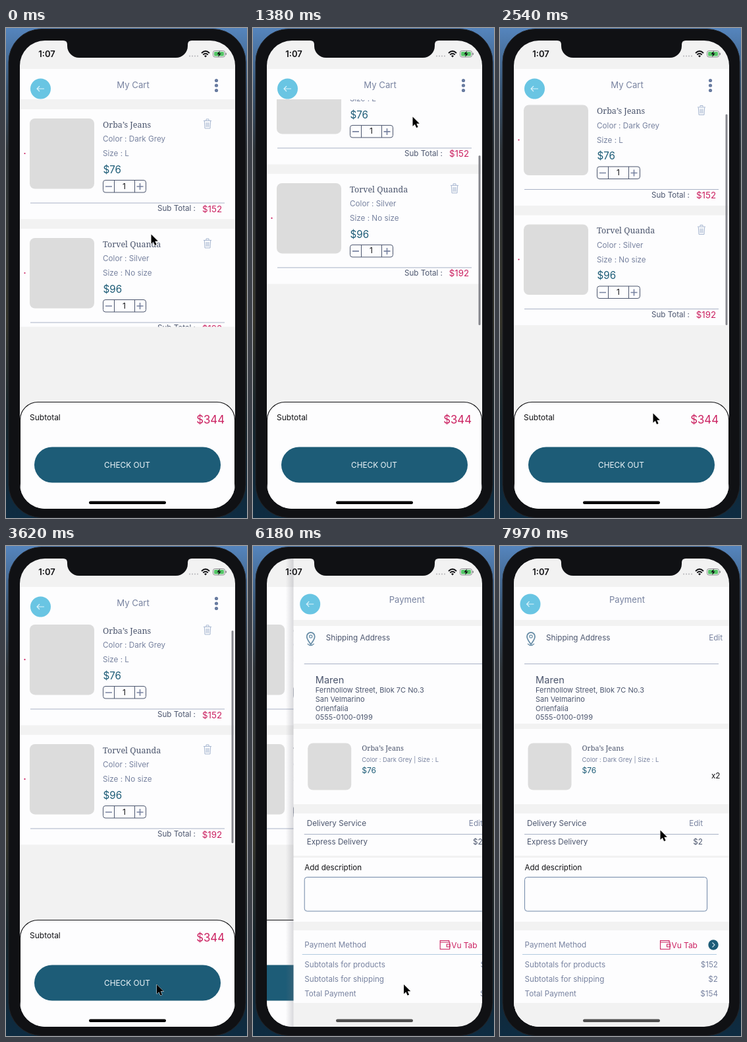
Recreate the animation shown at these times as an HTML page. Size 366x742 px, loop 8000 ms.

```html
<!DOCTYPE html>
<html lang="en">
<head>
<meta charset="utf-8">
<title>Cart to payment</title>
<style>
  html, body { margin: 0; width: 100%; height: 100%; overflow: hidden; background: #101114; }
  svg { display: block; width: 100vw; height: 100vh; font-family: Inter, "Open Sans", sans-serif; }
  .slab { font-family: "Noto Serif", serif; }
</style>
</head>
<body>
<svg id="stage" viewBox="0 0 366 742"></svg>
<script>
const LOOP = 8000;
const PAGE_WIDTH = 327;
const LIST = { top: 108, height: 344, maxScroll: 18 };
const C = {
  page: '#f2f2f2', paper: '#fdfdfe', photo: '#dcdcdc', bezel: '#101114',
  blue: '#1d5c77', sky: '#69c5e3', red: '#cb2060', ink: '#111114',
  slate: '#4c566e', muted: '#7883a0', line: '#a9b2c6'
};

// Shape helpers; text is placed by the vertical middle of its capitals.
const rect = (x, y, w, h, fill, extra = '') =>
  `<rect x="${x}" y="${y}" width="${w}" height="${h}" fill="${fill}" ${extra}/>`;
const circle = (x, y, r, fill) => `<circle cx="${x}" cy="${y}" r="${r}" fill="${fill}"/>`;
const stroke = (d, color, width = 1, extra = '') =>
  `<path d="${d}" fill="none" stroke="${color}" stroke-width="${width}" ${extra}/>`;
const text = (x, y, str, size, fill, extra = '') =>
  `<text x="${x}" y="${y + size * 0.38}" font-size="${size}" fill="${fill}" ${extra}>${str}</text>`;
const middle = 'text-anchor="middle"';
const end = 'text-anchor="end"';
const band = (y1, y2) => rect(21, y1, PAGE_WIDTH, y2 - y1, C.paper);

const backButton = (x, y) => circle(x, y, 15.5, C.sky) +
  stroke(`M${x + 5.5} ${y}h-11m4 -4l-4 4l4 4`, '#dcf3fb', 1.1);

const trash = (x, y) => stroke(
  `M${x - 6} ${y - 4.5}h12M${x - 2} ${y - 5}v-2h4v2M${x - 4.7} ${y - 4}l.7 11h8l.7 -11` +
  `M${x - 2} ${y - 2}v7M${x} ${y - 2}v7M${x + 2} ${y - 2}v7`, '#a6b6d0');

function cartItem(dy, name, size, color, price, total) {
  return `<g transform="translate(0 ${dy})">` +
    band(123, 289.5) +
    rect(36, 137, 98, 106.5, C.photo, 'rx="8"') +
    circle(28.5, 190, 1.1, C.red) +
    text(147, 146, name, 12.5, C.slate, 'class="slab" font-weight="500"') +
    text(147, 168, 'Color : ' + color, 11.7, C.muted) +
    text(147, 190, 'Size : ' + size, 11.7, C.muted) +
    text(147.5, 214, price, 15.2, C.blue) +
    trash(306, 145) +
    rect(147.5, 230.5, 65, 18.5, 'none', `rx="3.5" stroke="${C.slate}"`) +
    stroke('M164.5 230.5v18.5M195.5 230.5v18.5', C.slate) +
    stroke('M151 240h10M198.5 240h10M203.5 235v10', C.muted, 1.6) +
    text(179.5, 239, '1', 12, C.ink, middle) +
    stroke('M37 265h295', C.line) +
    text(230, 273, 'Sub Total :', 11.6, C.slate) +
    text(328, 273.5, total, 13.3, C.red, end) +
    '</g>';
}

const cartPage =
  rect(21, 19, PAGE_WIDTH, 709, C.page) + band(62, 108) +
  backButton(52.5, 92) +
  text(193, 86, 'My Cart', 13.2, C.muted, middle) +
  [79.5, 87, 94.5].map(y => circle(319.5, y, 2.6, '#687ba0')).join('') +
  `<g clip-path="url(#listClip)"><g id="list">` +
  cartItem(0, 'Orba’s Jeans', 'L', 'Dark Grey', '$76', '$152') +
  cartItem(181, 'Torvel Quanda', 'No size', 'Silver', '$96', '$192') +
  '</g></g>' +
  rect(342.5, 110, 3, 322, '#85868c', 'id="scrollbar" rx="1.5"') +
  rect(21.5, 566.5, 326, 300, C.paper, `rx="27" stroke="${C.ink}" stroke-width="1.1"`) +
  text(36, 589, 'Subtotal', 12, C.ink) +
  text(332, 592.3, '$344', 16.8, C.red, end) +
  `<g id="button">${rect(43, 634.5, 283, 54, C.blue, 'rx="27"')}</g>` +
  text(184, 661.7, 'CHECK OUT', 11.8, '#eef6fa', middle);

const addressLines = ['Fernhollow Street, Blok 7C No.3', 'San Velmarino', 'Orlenfalia', '0555-0100-0199'];
const totals = [['Subtotals for products', '$152'], ['Subtotals for shipping', '$2'], ['Total Payment', '$154']];

const paymentPage =
  rect(9, 19, 12, 709, 'url(#edgeShadow)', 'id="shadow"') +
  rect(21, 19, PAGE_WIDTH, 709, C.page) +
  [[62, 112], [121, 269], [277, 391], [405, 469], [472, 569], [582, 692]].map(b => band(...b)).join('') +
  backButton(46, 88) +
  text(193, 81.5, 'Payment', 13.1, C.muted, middle) +
  // Shipping
  stroke('M47 149c-4 -6 -6 -8 -6 -12a6 6 0 0 1 12 0c0 4 -2 6 -6 12z', '#6b8fa8', 1.8) +
  stroke('M49.2 137a2.2 2.2 0 1 1 -4.4 0a2.2 2.2 0 1 1 4.4 0M42 148q5 5 10 0', '#6b8fa8', 1.2) +
  text(70, 138.5, 'Shipping Address', 11.7, C.slate) +
  text(338, 138.5, 'Edit', 11.7, C.muted, end) +
  stroke('M37 178.5h295', C.line) +
  text(54, 202, 'Maren', 14.6, C.slate) +
  addressLines.map((s, i) => text(54, 218 + i * 13.7, s, 11, C.slate)).join('') +
  // Product
  rect(42.5, 298.5, 66, 71, C.photo, 'rx="8"') +
  text(124.5, 306, 'Orba’s Jeans', 10.9, C.slate, 'class="slab" font-weight="500"') +
  text(124.5, 323, 'Color : Dark Grey | Size : L', 9.4, C.muted) +
  text(124.5, 339.5, '$76', 12, C.blue) +
  text(334.5, 348, 'x2', 11.7, C.ink, end) +
  // Delivery
  text(41, 420, 'Delivery Service', 11.7, C.slate) +
  text(308, 420, 'Edit', 11.7, C.muted, end) +
  stroke('M37 436.5h295', C.line) +
  text(41, 448, 'Express Delivery', 11.7, C.slate) +
  text(308, 447.5, '$2', 11.7, C.slate, end) +
  text(37.5, 487, 'Add description', 11.6, C.ink) +
  rect(37.5, 501.5, 277, 51.5, 'none', 'rx="4" stroke="#7088a8"') +
  // Payment method
  text(37.5, 604, 'Payment Method', 11.7, C.muted) +
  stroke('M257 600v-2.5h-13.5v13h14.5v-10.5h-14M258.5 603h-5v4h5z', C.red, 1.1) +
  text(260.5, 604, 'Vu Tab', 11.9, C.red) +
  circle(324, 604, 7.7, C.blue) + stroke('M322.5 600.5l3.5 3.5l-3.5 3.5', '#cfe4ee', 1.1) +
  stroke('M34 618.5h295', '#b2cbe0') +
  totals.map(([label, sum], i) =>
    text(37.5, 634 + i * 22, label, 11.7, C.muted) + text(331, 634 + i * 22, sum, 11.7, C.muted, end)).join('');

const statusBar =
  text(62, 39.5, '1:07', 13, C.ink, middle + ' font-weight="600"') +
  [279, 283, 287, 291].map(x => circle(x, 42.5, 1, '#b4b4b8')).join('') +
  stroke('M297 38q6 -6 12 0M299.3 40.5q3.7 -3.6 7.4 0', C.ink, 1.9) +
  `<path d="M301 42.2q2 -1.8 4 0l-2 2.4z" fill="${C.ink}"/>` +
  rect(314.5, 34.5, 18, 9.5, 'none', 'rx="2.8" stroke="#8c8c90"') +
  rect(316, 36, 15, 6.5, '#55c667', 'rx="1.5"') + rect(333.5, 37.5, 1.5, 3.5, '#8c8c90', 'rx=".7"') +
  `<path d="M324.8 34.5l-4.5 5.2h2.8l-.9 4.3l4.6 -5.4h-2.8z" fill="${C.ink}"/>`;

document.getElementById('stage').innerHTML = `
  <defs>
    <clipPath id="screenClip"><rect x="21" y="19" width="${PAGE_WIDTH}" height="709" rx="38"/></clipPath>
    <clipPath id="listClip"><rect x="21" y="${LIST.top}" width="${PAGE_WIDTH}" height="${LIST.height + 0.5}"/></clipPath>
    <linearGradient id="edgeShadow">
      <stop stop-color="#70707a" stop-opacity="0"/><stop offset="1" stop-color="#70707a" stop-opacity=".3"/>
    </linearGradient>
    <linearGradient id="desktop" x2="0" y2="1">
      <stop stop-color="#5585bd"/><stop offset=".12" stop-color="#3a5878"/>
      <stop offset=".25" stop-color="#2e3438"/><stop offset=".6" stop-color="#35342a"/>
      <stop offset=".8" stop-color="#14232a"/><stop offset="1" stop-color="#0e2c42"/>
    </linearGradient>
  </defs>
  ${rect(0, 0, 366, 742, 'url(#desktop)')}
  ${rect(4, 1.5, 360, 740, C.bezel, 'rx="50" stroke="#222429"')}
  <g clip-path="url(#screenClip)">
    <g id="cart">${cartPage}</g>
    <g id="payment">${paymentPage}</g>
    ${statusBar}
    ${rect(126, 716.5, 117, 4.5, '#000', 'id="homeBar" rx="2.2"')}
  </g>
  <path d="M87 18h195v1q-6 0 -6 6v2a18 18 0 0 1 -18 18h-147a18 18 0 0 1 -18 -18v-2q0 -6 -6 -6z" fill="${C.bezel}"/>
  <path id="cursor" d="M0 0v14.2l3.3 -3l2.3 5.3l2.5 -1.1l-2.3 -5.1h4.5z"
    fill="#000" stroke="#fff" stroke-width="1" paint-order="stroke"/>`;

const el = id => document.getElementById(id);
const [list, scrollbar, button, cart, payment, shadow, homeBar, cursor] =
  ['list', 'scrollbar', 'button', 'cart', 'payment', 'shadow', 'homeBar', 'cursor'].map(el);
const clamp01 = v => Math.min(1, Math.max(0, v));
const move = (node, x, y) => node.setAttribute('transform', `translate(${x} ${y})`);

function stepAt(ms) {
  const phase = ms % 140;
  return 3 * Math.floor(ms / 140) + (phase < 20 ? 0 : phase < 120 ? 1 : 2);
}

// Smooth, non-overshooting curve through [step, ...values] keys.
function track(keys, n) {
  const i = keys.findIndex(k => k[0] > n) - 1;
  if (i < 0) return keys[keys.length - 1].slice(1);
  const span = keys[i + 1][0] - keys[i][0];
  const p = (n - keys[i][0]) / span;
  return keys[i].slice(1).map((from, c) => {
    const slope = j => keys[j] && keys[j + 1]
      ? (keys[j + 1][c + 1] - keys[j][c + 1]) / (keys[j + 1][0] - keys[j][0]) : 0;
    const tangent = j => {
      const a = slope(j - 1), b = slope(j);
      return a * b > 0 ? 2 * a * b / (a + b) : 0;
    };
    const ease = p * p * (3 - 2 * p);
    return from + slope(i) * span * ease +
      span * p * (1 - p) * (tangent(i) * (1 - p) - tangent(i + 1) * p);
  });
}

// Times below are in steps.
const RELEASE = 31.5, PRESS = 104, LIFT = 112, PUSH = 124.4;
const cursorKeys = [
  [0, 220.5, 312.5], [16, 228.5, 194.5], [28, 242.5, 134.5], [43, 242.5, 134.5],
  [55, 232.5, 583.5], [66, 229, 664], [139, 229, 664], [166, 243.5, 430.5]
];
const cursorAt = n => track(cursorKeys, n);

// Critically damped spring: 1 at rest start, falling to 0.
function spring(n, rate) {
  const s = Math.max(0, n) * rate;
  return (1 + s) * Math.exp(-s);
}

// The list follows the pointer with rubber-band resistance, then springs back.
function scrollAt(n) {
  const slop = 14;
  const drag = Math.max(0, cursorKeys[0][2] - slop - cursorAt(Math.min(n, RELEASE))[1]);
  if (drag <= LIST.maxScroll) return drag;
  const pull = 0.55 * (drag - LIST.maxScroll);
  return LIST.maxScroll + pull / (1 + pull / LIST.height) * spring(n - RELEASE, 0.215);
}

function render(n) {
  const scroll = scrollAt(n);
  move(list, 0, -scroll);
  scrollbar.setAttribute('y', 110 + scroll);
  scrollbar.setAttribute('height', Math.min(322, 340 - scroll));
  scrollbar.setAttribute('opacity', clamp01(n / 4));

  const pressed = clamp01((n - PRESS) / 6) - clamp01((n - LIFT) / 10);
  button.setAttribute('opacity', 1 - 0.77 * pressed);

  const slide = spring(n - PUSH, 0.42);
  move(cart, -0.3 * PAGE_WIDTH * (1 - slide), 0);
  move(payment, PAGE_WIDTH * slide, 0);
  shadow.setAttribute('opacity', 1 - slide);
  homeBar.setAttribute('opacity', 1 - 0.32 * clamp01((1 - slide) * 1.3));

  move(cursor, ...cursorAt(n));
}

const start = performance.now();
function frame() {
  render(stepAt((performance.now() - start) % LOOP));
  requestAnimationFrame(frame);
}
frame();
</script>
</body>
</html>
```
